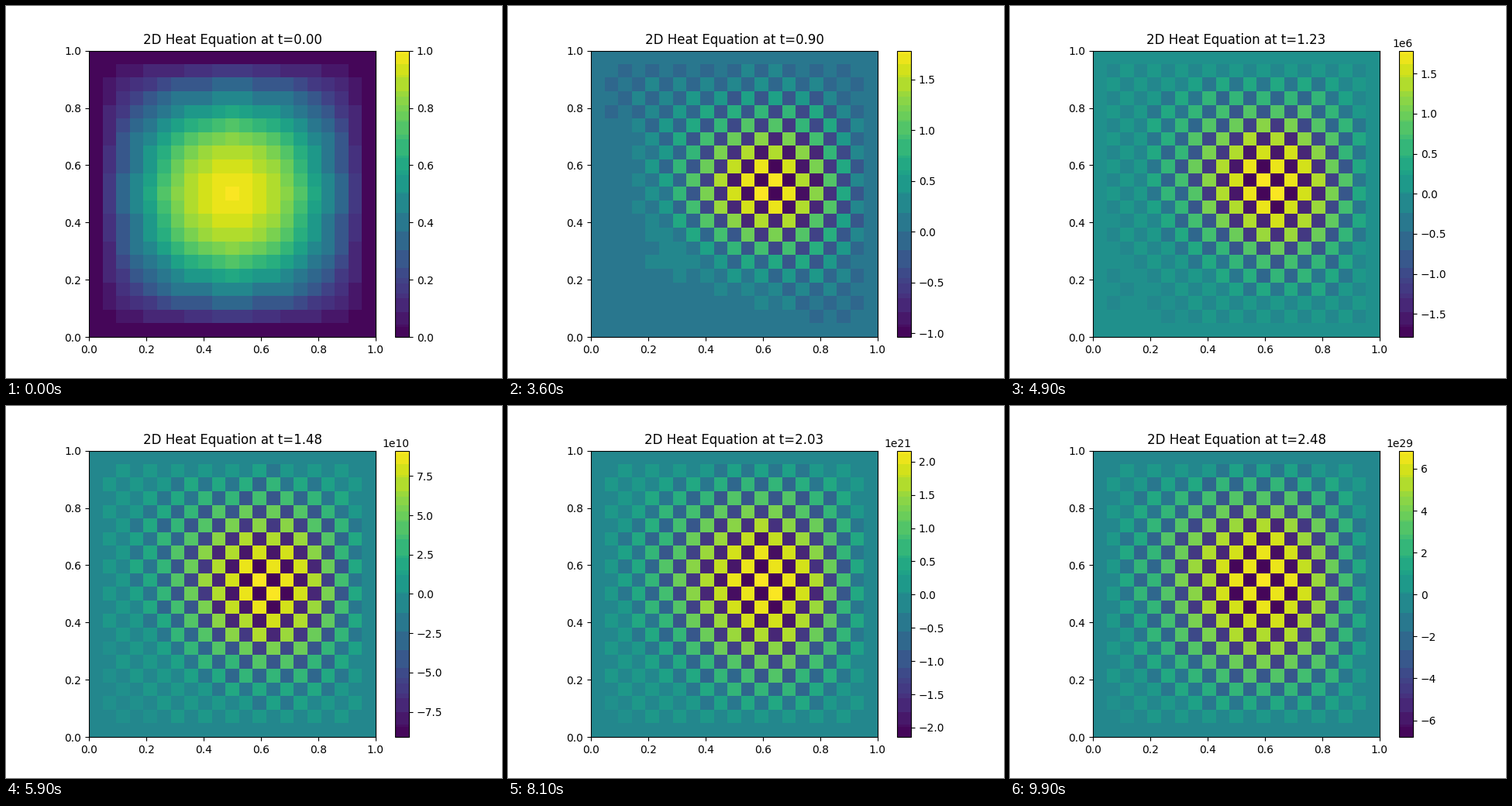
Recreate the animation shown at these times as a matplotlib script. Size 640x480 px, loop 10000 ms.

```python
import numpy as np
import matplotlib.pyplot as plt
from matplotlib.animation import FuncAnimation
from matplotlib.colors import ListedColormap

FRAMES, INTERVAL = 100, 100
CELLS = 20
DT = 0.025
ONSET = 36  # step at which the mode weights below apply

# Weights of the unstable modes, keyed by their envelope (p, q)
MODES = {
    (1, 1): 0.91, (2, 1): -0.39, (3, 1): -0.03,
    (1, 2): -0.18, (1, 3): -0.19, (2, 3): 0.08,
    (3, 3): 0.04, (1, 5): 0.035,
}

k = np.arange(CELLS + 1)
checker = (-1.0) ** (k[:, None] + k[None, :])


def wave(p):
    s = np.sin(np.pi * p * k / CELLS)
    s[[0, -1]] = 0
    return s


def shape(p, q):
    return np.outer(wave(q), wave(p))


def damping(p, q):
    return 2 * sum(np.sin(np.pi * m / (2 * CELLS)) ** 2 for m in (p, q))


def field(n):
    """Explicit scheme at step n: decaying bump plus growing checkerboard."""
    heat = (1 - damping(1, 1)) ** n * shape(1, 1)
    noise = sum(c * (3 - damping(*m)) ** float(n - ONSET) * shape(*m)
                for m, c in MODES.items())
    return heat + (-1) ** n * checker * noise


def banded_viridis():
    """Viridis with neighbouring colours merged into flat bands."""
    rgb = plt.get_cmap("viridis")(np.arange(256), bytes=True)[:, :3].astype(int)
    key = rgb // [32, 16, 32] @ [256, 16, 1]
    bands = [rgb[key == v].mean(axis=0) / 255 for v in key]
    return ListedColormap(bands)


fig, ax = plt.subplots(figsize=(6.4, 4.8), dpi=100)
im = ax.imshow(field(0), cmap=banded_viridis(), origin="lower",
               extent=[0, 1, 0, 1])
fig.colorbar(im, ax=ax)
title = ax.set_title("")


def draw(n):
    u = field(n)
    im.set_data(u)
    im.set_clim(u.min(), u.max())
    # the tiny offset rounds halves upwards
    title.set_text(f"2D Heat Equation at t={n * DT + 1e-9:.2f}")
    return im, title


anim = FuncAnimation(fig, draw, frames=FRAMES, interval=INTERVAL, repeat=True)
plt.show()
```
